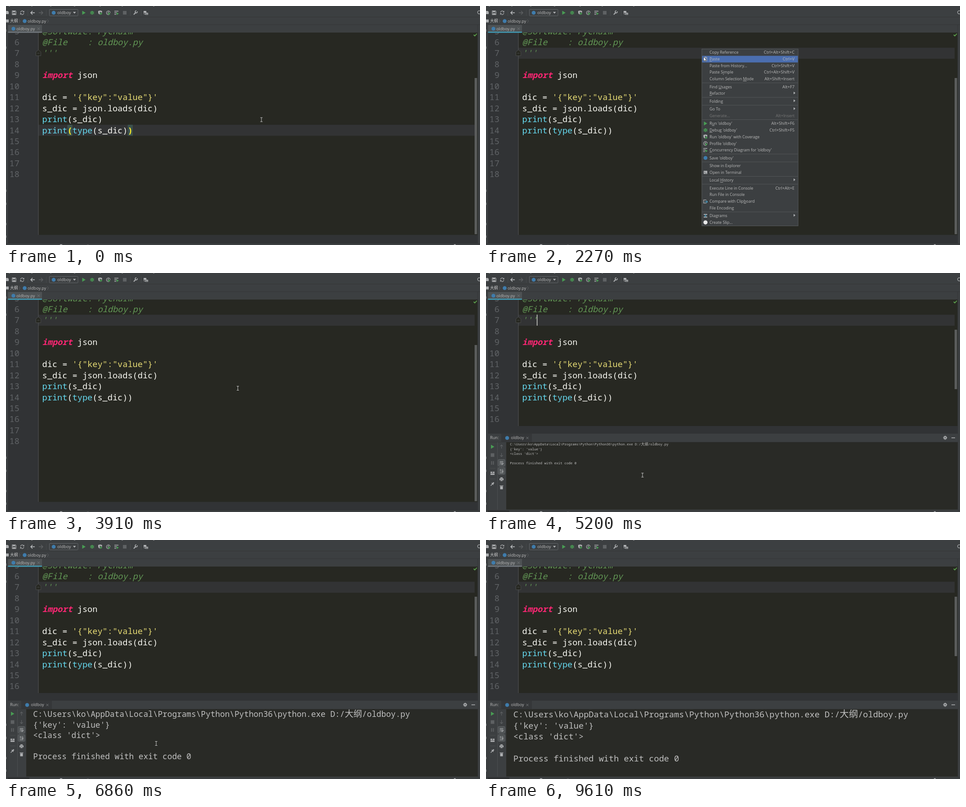
Write an HTML page that moves like this. It is 1054 px wide and 531 px high and loops after 9710 ms.

```html
<!DOCTYPE html>
<html lang="en">
<head>
<meta charset="utf-8">
<title>Editor run</title>
<style>
html, body { margin: 0; width: 100%; height: 100%; overflow: hidden; background: #3c3f41; }
svg { display: block; width: 1054px; height: 531px; }
text { white-space: pre; font-family: "Open Sans", "Noto Sans", sans-serif; }
.mono, .mono tspan { font-family: "Noto Sans Mono", "Noto Sans CJK SC", monospace; }
.code { font-size: 18.63px; fill: #f8f8f2; }
.num { fill: #606366; text-anchor: end; }
.doc { fill: #629755; font-style: italic; }
.key { fill: #f92672; font-style: italic; font-weight: bold; }
.str { fill: #e6db74; }
.fn { fill: #66d9ef; }
.hit { fill: #ffef28; font-weight: bold; }
.cjk { font-size: 1.09em; font-weight: 300; }
.u { text-decoration: underline; }
</style>
</head>
<body>
<svg id="stage" viewBox="0 0 1054 531"></svg>
<script>
const LOOP = 9710;
const GREEN = '#499c54', GREY = '#afb1b3', DIM = '#5e6163', PANEL = '#3c3f41', GUTTER = '#313335', LOGO = '#3f7cac';
const LINE = 24.45, COL = 11.18, LEFT = 80.6;
const lineTop = n => 92.7 + (n - 7) * LINE;
const baseline = n => lineTop(n) + 18.7;

const rect = (x, y, w, h, fill, more = '') =>
  `<rect x="${x}" y="${y}" width="${w}" height="${h}" fill="${fill}" ${more}/>`;
const path = (d, stroke = GREY, width = 1.2) =>
  `<path d="${d}" fill="none" stroke="${stroke}" stroke-width="${width}"/>`;
const solid = (d, fill) => `<path d="${d}" fill="${fill}"/>`;
const dot = (r, fill) => `<circle r="${r}" fill="${fill}"/>`;
const label = (x, y, text, size = 9.2, fill = '#bbb', more = '') =>
  `<text x="${x}" y="${y + 3.2}" font-size="${size}" fill="${fill}" ${more}>${text}</text>`;
const group = (id, body) => `<g id="${id}">${body}</g>`;

const play = solid('M-3.5-4.5 4 0-3.5 4.5z', GREEN);
const smallPlay = solid('M0-1 5 2 0 5z', GREEN);
const icons = {
  run: play,
  bug: path('M-4.5-2.5 4.5 2.5M-4.5 2.5 4.5-2.5M-4.5 0H4.5', GREEN, 1) +
    `<ellipse rx="2.8" ry="4" fill="${GREEN}"/>` + path('M-2-1H2M-2 1.5H2', PANEL, .7),
  cover: solid('M-4.5-4 0-5 4-4V0L0 4.5Q-4.5 3-4.5-1z', GREY) + path('M0-1V5L5 2z', PANEL, 2) + smallPlay,
  profile: path('M2 3.8A4.2 4.2 0 1 1 4.2 0M0-3V0L-2 1') + smallPlay,
  threads: path('M-5-3.5H4M-5 0H1M-5 3.5H-1', GREY, 1.5) + smallPlay,
  stop: rect(-4, -4, 8, 8, DIM),
  save: path('M-4-4H3L4-3V4H-4z', GREY, 1.3) + rect(-2.5, -4, 4.5, 3, GREY) + rect(-2.5, 1, 5, 3, GREY),
  sync: path('M-3.8-.5A3.8 3.8 0 0 1 3-2.5M3.8.5A3.8 3.8 0 0 1-3 2.5') +
    solid('M4.5-4.5V-1H1zM-4.5 4.5V1H-1z', GREY),
  back: path('M5 0H-4M0-4-4 0 0 4', '#c4c6c8', 1.4),
  next: path('M-5 0H4M0-4 4 0 0 4', DIM, 1.4),
  wrench: path('M-4 4 1-1', GREY, 2.2) + path('M3.8-3.2A2.5 2.5 0 1 1 2-4.5', GREY, 1.6),
  tree: rect(-5, -4, 6, 4, GREY) + path('M-4 0V3H0', GREY, 1) + rect(-1, 0, 6, 4.5, GREY) + path('M1 1V4M3 1V4', PANEL, .8),
  clip: path('M-3-3.5H3V4H-3z') + rect(-1.5, -5, 3, 2.4, GREY),
  python: dot(4.3, LOGO),
  badge: dot(4.6, '#e8e8e8'),
  term: rect(-4, -3.5, 8, 7, GREY) + path('M-2.5-1.5-.8 0-2.5 1.5M0 2H2.5', PANEL, .9),
  compare: path('M2-3H-4V4H2', GREY, 1.3) + path('M-2 1H4M2-1.5 4.5 1 2 3.5', '#4a9fc4', 1.3),
  diagram: path('M-4-3H4M-4 3H4', GREY, 2) + path('M0-3V3M-2.5 0H2.5', '#4a9fc4', 1.2),
  pause: rect(-3, -4, 2, 8, DIM) + rect(1, -4, 2, 8, DIM),
  layout: rect(-4.5, -3.5, 4, 3, GREY) + rect(.5, -3.5, 4, 3, GREY) + rect(-4.5, .5, 9, 3, GREY),
  pin: path('M-4 4-.5.5M-2-2 2 2M0-1 2.5-3.5M1 0 3.5-2.5', GREY, 1.5),
  up: path('M0 4V-4M-3-1 0-4 3-1', DIM),
  down: path('M0-4V4M-3 1 0 4 3 1', DIM),
  wrap: path('M-4-3H4M-4 0H3Q5 1.5 3 3H0M-4 3H-2M1.5 1.5 0 3 1.5 4.5'),
  tail: path('M-4 4H4M-4-3H0M-4 0H0M2.5-4V2M.5 0 2.5 2 4.5 0'),
  print: rect(-4.5, -1.5, 9, 4, GREY) + rect(-2.5, -4, 5, 1.8, GREY) + rect(-2.5, 1.5, 5, 3, GREY, 'stroke="#3c3f41" stroke-width=".7"'),
  trash: rect(-3, -2, 6, 6.5, GREY) + rect(-4, -4, 8, 1.3, GREY),
  gear: path('M0-4.5V4.5M-4.5 0H4.5M-3-3 3 3M-3 3 3-3', GREY, 1.6) + dot(3, GREY) + dot(1.3, PANEL)
};
const icon = (name, x, y) => `<g transform="translate(${x} ${y})">${icons[name]}</g>`;

const codeLines = {
  5: [['doc', '@Software: PyCharm']],
  6: [['doc', '@File    : oldboy.py']],
  7: [['doc', "'''"]],
  9: [['key', 'import'], ['', ' json']],
  11: [['', 'dic = '], ['str', `'{"key":"value"}'`]],
  12: [['', 's_dic = json.loads(dic)']],
  13: [['fn', 'print'], ['', '(s_dic)']],
  14: [['fn', 'print'], ['', '('], ['fn', 'type'], ['', '(s_dic))']]
};

function editor() {
  let out = rect(72, 59, 977, 450, '#272822') + rect(5, 59, 67, 450, GUTTER) +
    rect(72, 0, 970, LINE, '#323334', 'id="row"') + rect(71.5, 59, 1, 450, '#555759');
  for (let n = 5; n <= 18; n++)
    out += `<text class="mono code num" x="29.9" y="${baseline(n)}">${n}</text>`;
  for (const [n, parts] of Object.entries(codeLines)) {
    const spans = parts.map(([kind, s]) => `<tspan class="${kind}">${s}</tspan>`).join('');
    out += `<text class="mono code" x="${LEFT}" y="${baseline(+n)}">${spans}</text>`;
  }
  const brackets = [[5, '('], [17, ')']].map(([col, c]) => {
    const x = LEFT + col * COL;
    return rect(x, lineTop(14), COL, LINE, '#3b514d') +
      `<text class="mono code hit" x="${x}" y="${baseline(14)}">${c}</text>`;
  }).join('');
  return out + group('match', brackets) +
    `<path d="M66.500 110.500V102L72 97.500 77.500 102V110.500z" fill="#272822" stroke="#484a4a"/>` +
    path('M69.500 105H74.500', '#484a4a', 1) +
    rect(113, 92.5, 1.2, 24.5, '#f8f8f0', 'id="caret"') +
    rect(1042, 0, 5.5, 1, '#5b5d5c', 'id="bar"') + path('M1040 64 1042.500 66.500 1047 61.500', '#5fa84f', 1.8);
}

function chrome() {
  let out = rect(0, 0, 1054, 59, PANEL) + rect(0, 59, 5, 472, PANEL) + rect(1049, 59, 5, 472, PANEL) +
    rect(4.5, 59, .8, 468, '#323435') + rect(1048.5, 42, .8, 485, '#323435') +
    rect(0, 24, 1054, .8, '#323435') + rect(0, 41, 1054, .8, '#323435') +
    rect(5, 508.5, 1044, 18.5, GUTTER) + rect(0, 527, 1054, 1, '#323435') + rect(0, 528, 1054, 3, PANEL);
  for (const x of [6, 56, 98, 151, 208, 257, 327]) out += rect(x, 0, 3, 1, '#8c8e90');
  for (const y of [52, 90, 408, 437, 482, 510]) out += rect(0, y, 1, 5, '#85888a');
  out += rect(120, 529.5, 5, 1.5, GREY) + rect(180, 530, 4, 1, DIM) + rect(996, 529.5, 4, 1.5, GREY) +
    path('M1054 11A3.500 3.500 0 1 0 1054 17', GREY);

  out += solid('M0 11H4L6 13V18H0z', GREY);
  const bar = { save: 18, sync: 36, back: 59, next: 78, run: 173, bug: 191.5, cover: 209.5,
    profile: 227.5, threads: 246, stop: 264, wrench: 288, tree: 311 };
  for (const [name, x] of Object.entries(bar)) out += icon(name, x, 15);
  for (const x of [48, 89, 276, 300]) out += rect(x, 8, .7, 14, '#4d5052');
  out += rect(96.5, 7.5, 63.5, 14.5, PANEL, 'rx="1.5" stroke="#626669"') + icon('python', 106, 15) +
    label(114, 15, 'oldboy', 9.7) + solid('M149 13H155.500L152.200 17z', GREY);

  out += rect(0, 30, 6, 6.5, GREY) + label(9, 33, '大纲', 8.8, '#ccc', 'style="font-family:\'Noto Sans CJK SC\',sans-serif"') +
    path('M29 30 31.500 33.500 29 37', DIM, 1) + icon('python', 41.5, 33.5) + label(48, 33.5, 'oldboy.py') +
    path('M92 30 94.500 33.500 92 37', DIM, 1);

  return out + rect(4.5, 42, 75.5, 17, '#4e5254') + rect(4.5, 57, 75.5, 2.5, '#439eb8', 'id="tab"') +
    icon('python', 16.5, 50.5) + label(23, 50.5, 'oldboy.py') + path('M70 48 75 53M75 48 70 53', '#777a7c', 1);
}

function runPanel() {
  let out = rect(5, 340, 1044, 16, GUTTER) + rect(5, 356, 1044, 20, PANEL) +
    rect(5, 356, 1044, 1, '#323435') + rect(5, 375, 1044, .8, '#323435') +
    rect(34, 357, 68, 18.5, '#353739') + label(9, 366, 'Run:') + icon('python', 47, 366.5) + label(55.5, 366, 'oldboy') +
    path('M89.500 364 94.500 369M94.500 364 89.500 369', '#777a7c', 1) +
    icon('gear', 1021, 366) + rect(1035, 365.5, 8, 1.5, GREY) +
    rect(5, 376, 40, 150, PANEL) + rect(45, 376, 1004, 150, '#292a26') + rect(25, 376, .8, 150, '#505355') +
    rect(5, 525.5, 1044, 2, PANEL) + rect(4, 527.5, 48, 3.5, '#2d2f30');
  for (const y of [421.8, 439.8])
    out += rect(27, y - 7.5, 15, 15, '#4c5052', 'rx="2" stroke="#64686a"');
  const first = { run: 386, stop: 404.5, pause: 422, layout: 445, pin: 468.5 };
  const second = { up: 386, down: 404, wrap: 421.8, tail: 439.8, print: 458, trash: 476 };
  for (const [name, y] of Object.entries(first)) out += icon(name, 14.5, y);
  for (const [name, y] of Object.entries(second)) out += icon(name, 34.5, y);
  for (const y of [433.5, 457]) out += rect(9, y, 12, .8, '#505355');
  return out + group('live', rect(10.5, 400.5, 8, 8, '#c75450')) + group('console', '');
}

// label | shortcut (">" opens a submenu) | icon; "-" is a separator, "_" marks the mnemonic
const menuItems = `Copy Reference|Ctrl+Alt+Shift+C
_Paste|Ctrl+V|clip
Paste from History...|Ctrl+Shift+V
Paste S_imple|Ctrl+Alt+Shift+V
Column Selection _Mode|Alt+Shift+Insert
-
Find _Usages|Alt+F7
_Refactor|>
-
Folding|>
-
Go To|>
Generate...|Alt+Insert
-
R_un 'oldboy'|Alt+Shift+F6|run
_Debug 'oldboy'|Ctrl+Shift+F5|bug
Run 'oldboy' with Coverage||cover
Profile 'oldboy'||profile
_Concurrency Diagram for 'oldboy'||threads
-
Save 'oldboy'||python
-
Show in Explorer
Open in Terminal||term
-
Local _History|>
-
Execute Line in Console|Ctrl+Alt+E
Run File in Console
Compare with Clip_board||compare
File Encoding
-
Diagrams|>|diagram
Create Slip...||badge`.split('\n');
const ROW = 14.75;
const menuRows = [];

function menu() {
  let out = rect(480, 95.5, 214, 393, PANEL, 'stroke="#565a5c"') + rect(480.5, 0, 213, ROW, '#4b6eaf', 'id="hover"');
  let y = 103;
  for (const item of menuItems) {
    if (item === '-') {
      out += rect(481, y - 6.4, 212, .9, '#55585a');
      y += 2.65;
      continue;
    }
    const [name, keys = '', pic] = item.split('|');
    const fill = name === 'Generate...' ? '#777' : '#bbb';
    out += label(497, y, name.replace(/_(.)/, '<tspan class="u">$1</tspan>'), 8.9, fill);
    if (keys === '>') out += solid(`M684 ${y - 4}L688 ${y - 1} 684 ${y + 2}z`, GREY);
    else out += label(686, y, keys, 9.3, fill, 'text-anchor="end"');
    if (pic) out += icon(pic, 488, y);
    menuRows.push(y);
    y += ROW;
  }
  return out;
}

const pointers =
  group('beam', path('M-2.5-4.5H2.5M0-4.5V4.5M-2.5 4.5H2.5', '#c8c8c8', 1)) +
  group('arrow', '<path d="M0 0V9.500L2.200 7.500 3.700 10.800 5.200 10.100 3.700 6.900H6.600z" fill="#fff" stroke="#222" stroke-width=".7"/>');

document.getElementById('stage').innerHTML = rect(0, 0, 1054, 531, PANEL) + editor() + chrome() +
  group('panel', runPanel()) + group('stopping', rect(260, 11, 8, 8, '#c75450')) + group('menu', menu()) + pointers;

// Step tables: [time, value...]
const pointerSteps = [
  [0, 568, 252.5], [310, 567.5, 254.5], [580, 566.5, 257],
  [1270, 560, 244], [1420, 541, 206], [1560, 515, 152], [1700, 492, 112], [1830, 481, 96],
  [2270, 484, 113], [2390, 490, 142], [2510, 499, 181], [2640, 508, 222], [2770, 514, 248], [2900, 515.5, 256],
  [4460, 516, 290], [4590, 516, 345], [4720, 515.5, 403], [4850, 488, 422], [5030, 368, 448],
  [5200, 348, 449], [5320, 338, 452], [5440, 334, 452],
  [7870, 450, 464], [8000, 640, 480], [8110, 813, 495], [8230, 939.5, 505.5]
];
const fontSteps = [
  [0, 14.84], [5590, 17], [5730, 20], [5870, 23], [6010, 26], [6140, 29], [6280, 31.5],
  [6590, 33], [6730, 34], [6860, 35.3], [7130, 37]
];
const caretSpans = [[1970, 2120], [4850, 5440], [7600, 8110], [8510, 9050]];

const at = (steps, t) => steps.findLast(step => step[0] <= t);
const $ = id => document.getElementById(id);
const show = (id, on) => $(id).setAttribute('visibility', on ? 'visible' : 'hidden');
const within = (t, from, to) => t >= from && t < to;

const command = 'C:\\Users\\ko\\AppData\\Local\\Programs\\Python\\Python36\\python.exe D:/<tspan class="cjk">大纲</tspan>/oldboy.py';
const output = ["{'key': 'value'}", "&lt;class 'dict'&gt;", '', 'Process finished with exit code 0'];

let consoleState = '';
function drawConsole(points, finished) {
  const state = points + '|' + finished;
  if (state === consoleState) return;
  consoleState = state;
  const step = .632 * points + 1.1;
  $('console').innerHTML = [command, ...(finished ? output : [])].map((s, i) =>
    `<text class="mono" x="${48.2 + .342 * points}" y="${375.2 + step * (i + .769)}" font-size="${points * .5035}" fill="#c0c0c0">${s}</text>`
  ).join('');
}

function draw(t) {
  const clicked = t >= 1970, menuOpen = within(t, 2120, 3910), panelOpen = t >= 4060;
  const running = within(t, 4060, 4460);
  const [, x, y] = at(pointerSteps, t);

  $('row').setAttribute('y', lineTop(clicked ? 7 : 14));
  show('match', !clicked);
  show('caret', caretSpans.some(([from, to]) => within(t, from, to)));
  $('tab').setAttribute('fill', within(t, 1970, 9610) ? '#439eb8' : '#747a80');
  $('bar').setAttribute('y', panelOpen ? 126 : 160);
  $('bar').setAttribute('height', panelOpen ? 132 : 347);

  show('menu', menuOpen);
  const row = menuRows.find(c => Math.abs(c - y - 2) <= ROW / 2 + 1.4);
  show('hover', menuOpen && t >= 2270 && row);
  if (row) $('hover').setAttribute('y', row - ROW / 2 + .3);
  if (!menuOpen) show('hover', false);

  show('panel', panelOpen);
  show('live', running);
  show('stopping', running);
  drawConsole(at(fontSteps, t)[1], t >= 4460);

  for (const id of ['beam', 'arrow']) $(id).setAttribute('transform', `translate(${x} ${y})`);
  show('beam', !menuOpen && t < 8380);
  show('arrow', menuOpen);
}

const start = performance.now();
function tick() {
  draw((performance.now() - start) % LOOP);
  requestAnimationFrame(tick);
}
tick();
</script>
</body>
</html>
```
